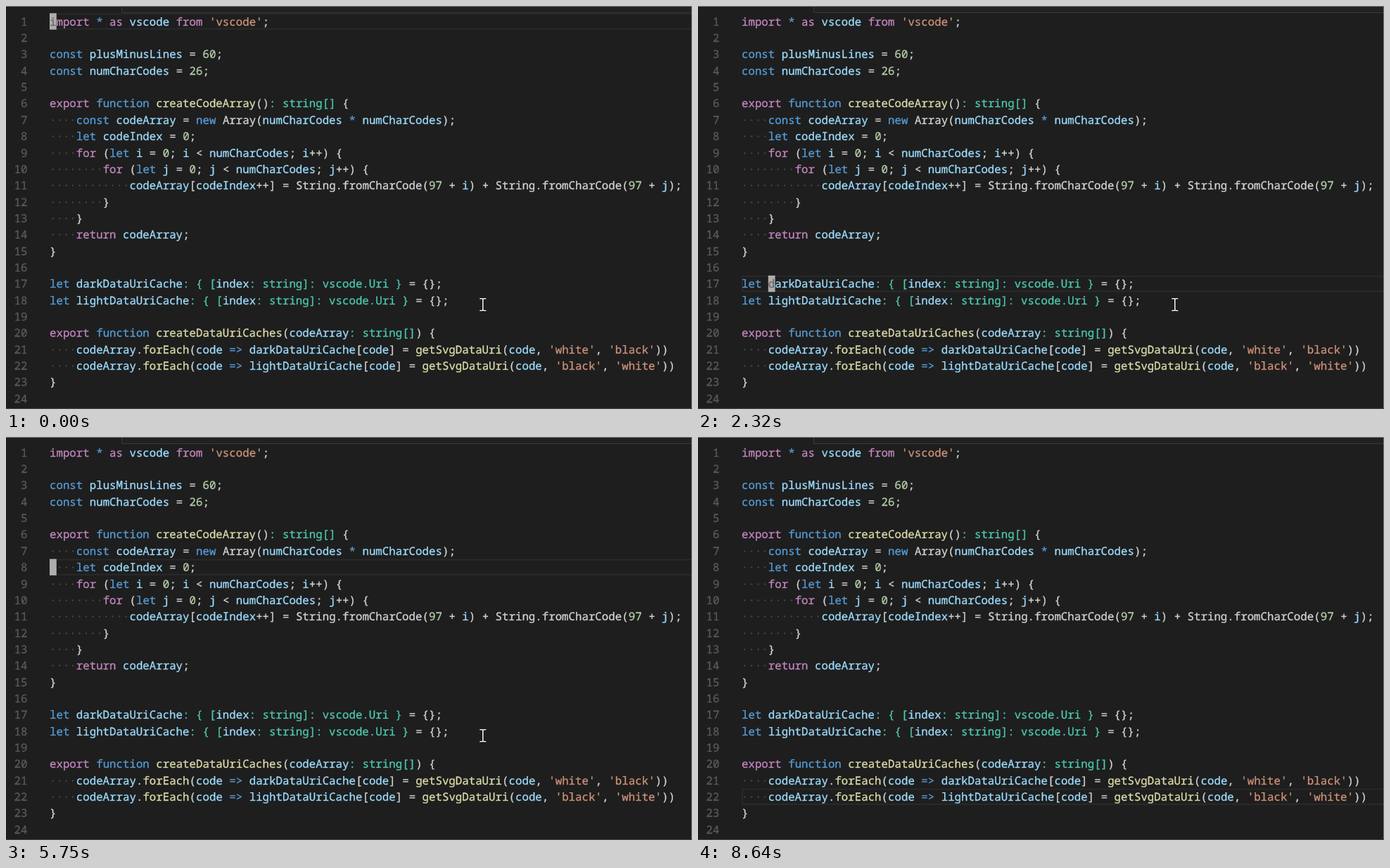
These frames come from a looping animation (975 by 574 pixels, 9.04 s). An HTML page:

```html
<!DOCTYPE html>
<html lang="en">
<head>
<meta charset="utf-8">
<title>Jump labels in a code editor</title>
<style>
  html, body { margin: 0; width: 100%; height: 100%; overflow: hidden; background: #1e1e1e; }
  svg { display: block; }
  text { font-family: "Noto Sans Mono", "DejaVu Sans Mono", monospace; font-size: 15.76px; text-rendering: geometricPrecision; stroke-width: 0.3px; }
  .tag { font-size: 11.9px; fill: #111; }
</style>
</head>
<body>
<svg id="stage" width="975" height="574" viewBox="0 0 975 574"></svg>
<script>
const LOOP = 9040, LEFT = 62, CELL = 9.457, TOP = 10.3, ROW = 23.35, BASE = 17.4;

const lines = `import * as vscode from 'vscode';

const plusMinusLines = 60;
const numCharCodes = 26;

export function createCodeArray(): string[] {
    const codeArray = new Array(numCharCodes * numCharCodes);
    let codeIndex = 0;
    for (let i = 0; i < numCharCodes; i++) {
        for (let j = 0; j < numCharCodes; j++) {
            codeArray[codeIndex++] = String.fromCharCode(97 + i) + String.fromCharCode(97 + j);
        }
    }
    return codeArray;
}

let darkDataUriCache: { [index: string]: vscode.Uri } = {};
let lightDataUriCache: { [index: string]: vscode.Uri } = {};

export function createDataUriCaches(codeArray: string[]) {
    codeArray.forEach(code => darkDataUriCache[code] = getSvgDataUri(code, 'white', 'black'))
    codeArray.forEach(code => lightDataUriCache[code] = getSvgDataUri(code, 'black', 'white'))
}

export function createSvgUri(code: string | null) {`.split('\n');

// First matching rule gives the token its colour.
const rules = [
  ["'[^']*'", '#ce9178'],
  [': \\{ \\[|: string\\]: vscode\\.Uri \\}|: string\\[\\]', '#4ec9b0'],
  ['String\\.fromCharCode|Array\\b', '#d4d4d4'],
  ['(?:import|from|as|export|for|return)\\b', '#c586c0'],
  ['(?:const|let|new|function)\\b|=>|\\*', '#569cd6'],
  ['\\d+', '#b5cea8'],
  ['\\w+(?=\\()', '#dcdcaa'],
  ['\\w+', '#9cdcfe'],
  ["[^\\w\\s':]+|:", '#d4d4d4']
];
const lexer = new RegExp(rules.map(r => `(${r[0]})`).join('|'), 'g');

// Time tables, in ms.
const blinks = [440, 870, 1310, 1890, 2750, 3150, 3740, 4180, 4760, 4890,
  5350, 5750, 6280, 6860, 7690, 8220, 8640];
const carets = [[0, 0, 0], [2320, 16, 4], [4890, 7, 0], [7260, 21, 4]];
const modes = [[0, ''], [1160, 'word'], [2320, ''], [3590, 'line'], [4890, ''], [6280, 'word'], [7260, '']];
const mice = [[0, 677.8, 425.3], [8220, 807.5, 515.3], [8370, 858, 545], [8490, 890, 564], [8640, -50, -50]];

const stage = document.getElementById('stage');
const colX = c => LEFT + c * CELL;
const rowY = r => TOP + r * ROW;

function add(parent, name, attrs, text) {
  const el = document.createElementNS('http://www.w3.org/2000/svg', name);
  for (const key in attrs) el.setAttribute(key, attrs[key]);
  if (text) el.textContent = text;
  return parent.appendChild(el);
}
const rect = (parent, x, y, width, height, fill, rx = 0) =>
  add(parent, 'rect', { x, y, width, height, fill, rx });
const write = (parent, col, row, fill, text) =>
  add(parent, 'text', { x: colX(col), y: rowY(row) + BASE, fill, stroke: fill }, text);

// Window background and edges
rect(stage, 0, 0, 975, 574, '#1e1e1e');
rect(stage, 165, 0, 810, 9, '#222223');
rect(stage, 164, 1, 1, 9, '#383838');
rect(stage, 164, 9, 811, 1, '#383838');

const band = add(stage, 'rect', { x: LEFT + 1, width: 930, height: ROW - 2,
  fill: 'none', stroke: '#292929', 'stroke-width': 2 });

lines.forEach((line, row) => {
  add(stage, 'text', { x: 30.5, y: rowY(row) + BASE, fill: '#5a5a5a', stroke: '#5a5a5a', 'text-anchor': 'end' }, String(row + 1));
  const indent = line.search(/\S/);
  if (indent > 0) write(stage, 0, row, '#484848', '·'.repeat(indent));
  for (const m of line.matchAll(lexer)) {
    const rule = m.slice(1).findIndex(g => g !== undefined);
    write(stage, m.index, row, rules[rule][1], m[0]);
  }
});

// Two-letter labels over every match of a pattern
function labelLayer(pattern) {
  const layer = add(stage, 'g', {});
  let n = 0;
  lines.forEach((line, row) => {
    for (const m of line.matchAll(pattern)) {
      const x = colX(m.index) + 1.3, y = rowY(row) + 0.8;
      const code = String.fromCharCode(97 + Math.floor(n / 26), 97 + n % 26);
      rect(layer, x, y, 17.7, 17.7, '#fff', 2);
      add(layer, 'text', { class: 'tag', x: x + 8.85, y: y + 12.4, 'text-anchor': 'middle' }, code);
      n++;
    }
  });
  return layer;
}
const layers = { word: labelLayer(/\w{2,}/g), line: labelLayer(/^.+/g) };

const caret = add(stage, 'g', {});
const block = rect(caret, 0, 0, CELL + 0.3, ROW, '#aeafad');
const letter = write(caret, 0, 0, '#686868', ' ');

const beam = add(stage, 'g', { fill: 'none' });
const beamPath = 'M-4.5-8.5h3.2q1.3 0 1.3 1.2v14.6q0 1.2-1.3 1.2h-3.2M4.5-8.5h-3.2q-1.3 0-1.3 1.2v14.6q0 1.2 1.3 1.2h3.2';
add(beam, 'path', { d: beamPath, stroke: '#111', 'stroke-width': 3.4 });
add(beam, 'path', { d: beamPath, stroke: '#f2f2f2', 'stroke-width': 1.6 });

rect(stage, 0, 0, 975, 1, '#757575');
rect(stage, 974, 0, 1, 574, '#757575');
rect(stage, 0, 573, 975, 1, '#444');

const at = (table, t) => table.filter(step => step[0] <= t).pop();

function draw(t) {
  const [, row, col] = at(carets, t);
  const [, mode] = at(modes, t);
  const [, mx, my] = at(mice, t);
  const lit = blinks.filter(b => b <= t).length % 2 === 0;

  band.setAttribute('y', rowY(row) + 1);
  block.setAttribute('x', colX(col));
  block.setAttribute('y', rowY(row));
  letter.setAttribute('x', colX(col));
  letter.setAttribute('y', rowY(row) + BASE);
  letter.textContent = lines[row][col];
  caret.style.display = lit ? '' : 'none';
  for (const name in layers) layers[name].style.display = name === mode ? '' : 'none';
  beam.setAttribute('transform', `translate(${mx} ${my})`);
}

const start = performance.now();
function tick() {
  draw((performance.now() - start) % LOOP);
  requestAnimationFrame(tick);
}
tick();
</script>
</body>
</html>
```
